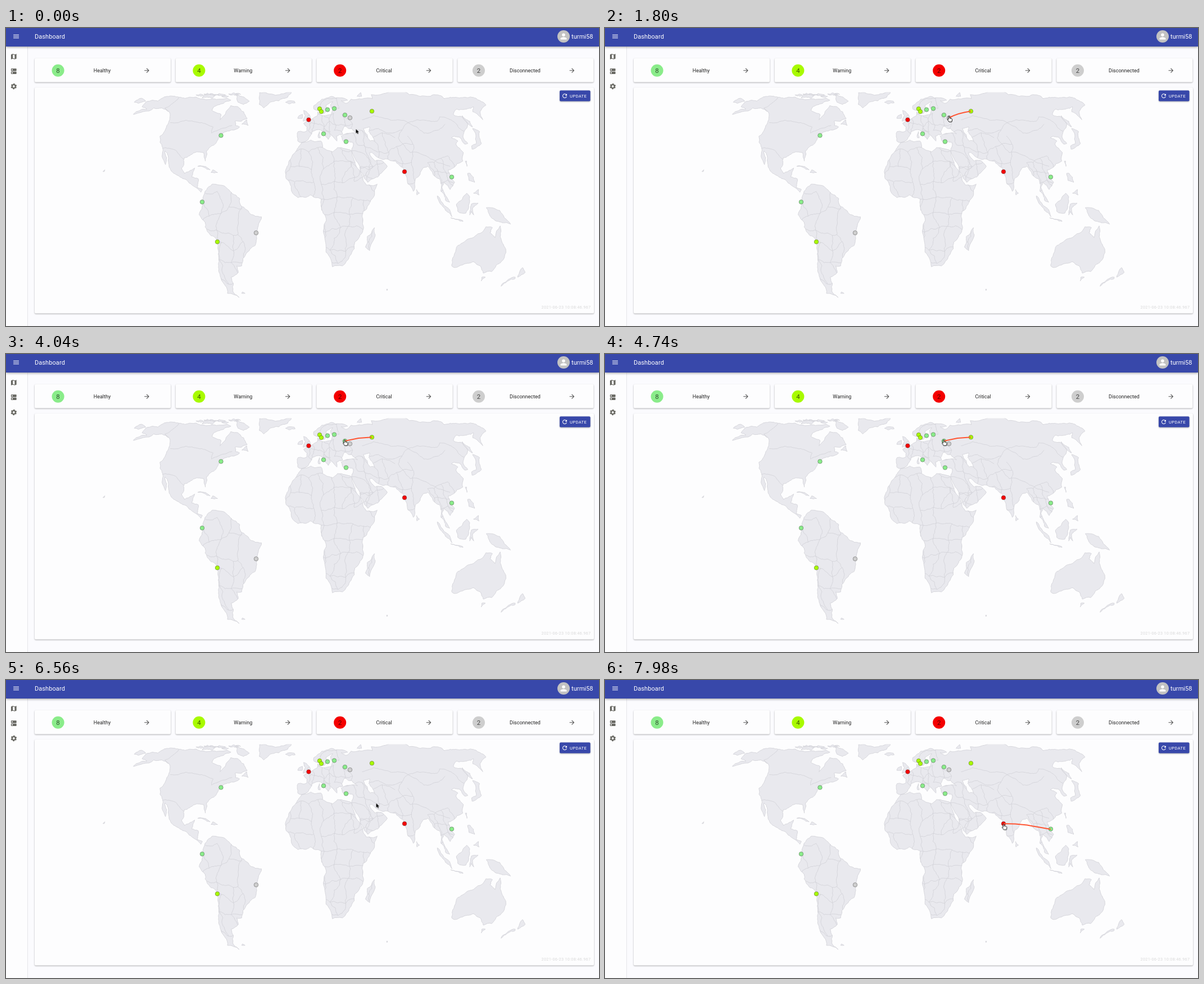
Animation of 1055 by 531 pixels, one loop 8000 ms. Source, as an HTML page:

```html
<!DOCTYPE html>
<html lang="en">
<head>
<meta charset="utf-8">
<title>Dashboard</title>
<style>
html, body { margin: 0; width: 100%; height: 100%; overflow: hidden; background: #fbfbfe; }
svg { display: block; width: 100%; height: 100%; font-family: Roboto, Arial, sans-serif; }
.paper { fill: #fdfdfe; filter: drop-shadow(0 1px 1px rgba(0,0,0,.32)); }
.bar { fill: #3848aa; filter: drop-shadow(0 1px 2px rgba(0,0,0,.4)); }
.bar-text { fill: #fff; font-size: 11px; letter-spacing: .08px; }
.label { fill: #222; font-size: 9px; text-anchor: middle; }
.count { fill: #000; fill-opacity: .65; font-size: 11.5px; text-anchor: middle; }
.icon { fill: #666660; }
.land { fill: #e9e9ee; }
.sea { fill: #fdfdfe; }
.border { fill: none; }
.land, .sea, .border { stroke: #d2d2d8; stroke-width: .85; stroke-linejoin: round; }
.dot { stroke: #444; stroke-opacity: .75; stroke-width: .6; }
.link { fill: none; stroke: #f53; stroke-width: 2; stroke-linejoin: round; visibility: hidden; }
.link, #arrow, #hand { animation: 8s step-end infinite; }
#cursor { animation: move 8s linear infinite; }
#arrow { animation-name: arrow; }
#hand { animation-name: hand; }
#link1 { animation-name: link1; }
#link2 { animation-name: link2; }
#link3 { animation-name: link3; }
@keyframes move {
  0% { transform: translate(622.5px, 180px); }
  3% { transform: translate(621px, 176px); }
  8.5% { transform: translate(615.3px, 160px); }
  10.5%, 36% { transform: translate(612px, 157px); }
  38.75% { transform: translate(608.5px, 156px); }
  43%, 65% { transform: translate(602.5px, 153px); }
  70% { transform: translate(608px, 161px); }
  82% { transform: translate(658.5px, 219.5px); }
  92%, 100% { transform: translate(709.3px, 256.5px); }
}
@keyframes arrow {
  0%, 38.5%, 67% { visibility: visible; }
  10%, 42%, 91.5%, 100% { visibility: hidden; }
}
@keyframes hand {
  0%, 38.5%, 67% { visibility: hidden; }
  10%, 42%, 91.5%, 100% { visibility: visible; }
}
@keyframes link1 { 0%, 40.5% { visibility: hidden; } 10% { visibility: visible; } }
@keyframes link2 { 0%, 67% { visibility: hidden; } 42% { visibility: visible; } }
@keyframes link3 { 0% { visibility: hidden; } 91.5%, 100% { visibility: visible; } }
</style>
</head>
<body>
<svg viewBox="0 0 1055 531">
  <defs>
    <clipPath id="frame"><rect x="52" y="114.5" width="994" height="390"/></clipPath>
    <clipPath id="inland"><path id="inland-path"/></clipPath>
    <path id="next" d="M12 4l-1.41 1.41L16.17 11H4v2h12.17l-5.58 5.59L12 20l8-8z" transform="scale(.54) translate(-12 -12)"/>
  </defs>

  <rect y="33" width="38" height="498" fill="#fdfdfe"/>
  <path d="M38.5 33V531" stroke="#e6e6ea"/>
  <rect class="bar" width="1055" height="33"/>
  <path d="M13.1 12.3H23M13.1 15H23M13.1 17.7H23" stroke="#fff" stroke-width="1.1"/>
  <text class="bar-text" x="51" y="19">Dashboard</text>
  <circle cx="992" cy="15" r="11" fill="#c2c2c2"/>
  <g fill="#fff" transform="translate(983.7 6.7) scale(.69)">
    <circle cx="12" cy="8" r="4"/>
    <path d="M12 14c-2.67 0-8 1.34-8 4v2h16v-2c0-2.66-5.33-4-8-4z"/>
  </g>
  <text class="bar-text" x="1006" y="19">turmi58</text>

  <g class="icon">
    <path transform="translate(7.3 44.5) scale(.54)" d="M20.5 3l-.16.03L15 5.1 9 3 3.36 4.9c-.21.07-.36.25-.36.48V20.5c0 .28.22.5.5.5l.16-.03L9 18.9l6 2.1 5.64-1.9c.21-.07.36-.25.36-.48V3.5c0-.28-.22-.5-.5-.5zM15 19l-6-2.11V5l6 2.11V19z"/>
    <path transform="translate(7.3 70.7) scale(.54)" fill-rule="evenodd" d="M4 3h16l1 1v6l-1 1H4l-1-1V4zM4 13h16l1 1v6l-1 1H4l-1-1v-6zM5 7a2 2 0 1 0 4 0a2 2 0 1 0-4 0zM5 17a2 2 0 1 0 4 0a2 2 0 1 0-4 0z"/>
    <g fill="none" stroke="#666660">
      <circle cx="13.8" cy="104" r="3" stroke-width="2.2"/>
      <circle cx="13.8" cy="104" r="4.4" stroke-width="1.8" stroke-dasharray="2.3" stroke-dashoffset="-1.15"/>
    </g>
  </g>

  <g id="cards"></g>
  <rect class="paper" x="51" y="106" width="995" height="402.5" rx="2"/>
  <g id="map" clip-path="url(#frame)"></g>
  <g id="dots"></g>
  <path class="link" id="link1" d="M612 160Q628 151.5 651 148.3"/>
  <path class="link" id="link2" d="M603 155L627 150 651 148.3"/>
  <path class="link" id="link3" d="M709 256L730 256.4 751 258.6 772 262.3 793 266"/>

  <rect x="985" y="111.3" width="54.6" height="19.2" rx="2" fill="#3848aa" style="filter:drop-shadow(0 1px 1px rgba(0,0,0,.3))"/>
  <path fill="#fff" transform="translate(988 115) scale(.5)" d="M17.65 6.35C16.2 4.9 14.21 4 12 4c-4.42 0-7.99 3.58-7.99 8s3.57 8 7.99 8c3.73 0 6.84-2.55 7.73-6h-2.08c-.82 2.33-3.04 4-5.65 4-3.31 0-6-2.69-6-6s2.69-6 6-6c1.66 0 3.14.69 4.22 1.78L13 11h7V4z"/>
  <text x="1003" y="123.7" fill="#fff" font-size="7.6" letter-spacing=".36">UPDATE</text>
  <text x="952.5" y="500" fill="#d9d9d9" font-size="7.3" letter-spacing=".3">2021-06-23 10:08:46.967</text>

  <g id="cursor" stroke-linejoin="round">
    <path id="arrow" transform="scale(.9)" d="M0 0V8.6L2 6.9 3.4 9.9 4.9 9.2 3.5 6.3H6.2Z" fill="#000" stroke="#fff" stroke-width=".7" paint-order="stroke"/>
    <path id="hand" d="M-1 .6Q0-1 1 .6V3.6L4.4 4.4Q6 4.9 5.7 6.6L4.9 10.3H.2L-2.7 6.5Q-3 5.2-1.9 5.3L-1 6Z" fill="#fff" stroke="#111"/>
  </g>
</svg>

<script>
const NS = 'http://www.w3.org/2000/svg';
const get = id => document.getElementById(id);
const parse = s => s.trim().split(/\s+/).map(p => p.split(',').map(Number));

function add(parent, tag, attrs, text) {
  const el = document.createElementNS(NS, tag);
  for (const k in attrs) el.setAttribute(k, attrs[k]);
  if (text) el.textContent = text;
  parent.append(el);
  return el;
}

// Each status owns its sites on the map; the card shows how many there are.
const statuses = [
  ['Healthy', '#8aec8a', '572,145.5 584,143.5 603,155 565,188.5 605,202.5 382.5,191.5 793,265.5 349,310'],
  ['Warning', '#a8fa00', '558,144 561,149 651,148.3 376,381'],
  ['Critical', '#f40000', '538.5,163.5 709,256'],
  ['Disconnected', '#cecece', '612,160 445,365']
];

statuses.forEach(([label, fill, sites], i) => {
  const g = get('cards'), x = 51 + i * 250.8, spots = parse(sites);
  const wide = label.length > 8 ? 4 : 0;
  const cx = x + 41.6 - wide;
  add(g, 'rect', { class: 'paper', x, y: 54, width: 242, height: 42.5, rx: 2 });
  add(g, 'circle', { cx, cy: 75.7, r: 11, fill });
  add(g, 'text', { class: 'count', x: cx, y: 79.8 }, String(spots.length));
  add(g, 'text', { class: 'label', x: x + 120, y: 79 }, label);
  add(g, 'use', { href: '#next', x: x + 199.5 + wide, y: 75.7, fill: '#555' });
  spots.forEach(([cx, cy]) => add(get('dots'), 'circle', { class: 'dot', cx, cy, r: 3.8, fill }));
});

// Equal Earth projection of degrees to stage pixels.
function project([lon, lat]) {
  const [a, b, c, d] = [1.340264, -.081106, .000893, .003796], rad = Math.PI / 180;
  const t = Math.asin(Math.sqrt(3) / 2 * Math.sin(lat * rad)), q = t * t, q3 = q ** 3;
  const slope = a + 3 * b * q + q3 * (7 * c + 9 * d * q);
  const x = 2 * lon * rad * Math.cos(t) / (Math.sqrt(3) * slope);
  const y = t * (a + b * q + q3 * (c + d * q));
  return [538.7 + 160.3 * x, 317 - 160.3 * y];
}

let seed = 7;
const rnd = () => (seed = seed * 16807 % 2147483647) / 2147483647;

// Splits a stretch at shifted midpoints until it looks like a natural line.
function wander(a, b, rough, out) {
  const dx = b[0] - a[0], dy = b[1] - a[1];
  if (Math.hypot(dx, dy) < 4) { out.push(a); return; }
  const k = (rnd() - .5) * rough;
  const m = [(a[0] + b[0]) / 2 + dy * k, (a[1] + b[1]) / 2 - dx * k];
  wander(a, m, rough, out);
  wander(m, b, rough, out);
}

function trace(points, closed, rough) {
  const pts = points.map(project), out = [], last = pts[pts.length - 1];
  pts.slice(1).forEach((p, i) => wander(pts[i], p, rough, out));
  if (closed) wander(last, pts[0], rough, out); else out.push(last);
  return 'M' + out.map(p => p.map(v => v.toFixed(1)).join(' ')).join('L') + (closed ? 'Z' : '');
}
const outline = s => trace(parse(s), true, .24);

// Coasts as key points in degrees, longitude first.
const northAmerica = `-168,66 -156,71 -141,70 -128,70 -114,68 -96,68 -88,69 -82,67 -87,64 -94,61 -93,58 -82,55
  -80,51 -78,55 -78,62 -70,61 -65,58 -62,57 -56,52 -66,50 -64,47 -60,46 -66,44 -70,43 -74,40.5 -76,35 -81,31
  -80,25 -83,30 -90,30 -97,27 -97,21 -94,18 -91,19 -87,21 -88,16 -83,15 -83,10 -79,9 -80,7.5 -86,11 -92,14.5
  -97,16 -105,20 -109,26 -114,31 -110,23 -117,33 -124,40 -124,48 -133,57 -144,60 -152,60 -158,57 -164,55 -157,59 -165,61`;
const southAmerica = `-77,8 -72,12 -62,10.5 -51,4 -50,0 -35,-6 -39,-14 -41,-22 -48,-26 -54,-34 -58,-34 -58,-38
  -65,-41 -65,-45 -68,-50 -65,-55 -74,-52 -74,-42 -71,-30 -70,-18 -76,-14 -81,-5 -78,2`;
const africa = `-6,36 10,37 11,33 19,30.5 23,33 34,31 34,28 37,21 43,11.5 51,12 48,5 40,-3 40,-15 35,-20 35,-24
  32,-28 27,-34 19,-34.5 12,-17 13,-8 9,0 9,4 5,4.5 1,6 -8,4.5 -13,9 -17,15 -17,21 -13,28 -10,31`;
const siberia = `5,59 5,62 14,68 25,71 33,69.5 41,67 34,66.5 38,64 45,68 54,68.5 68,68.5 70,73 80,73 88,75
  113,76 113,73 130,71 140,73 160,70 170,70 180,69 180,65 178,62.5 170,60 163,57 157,51 156,57 163,61 155,59.5`;
const orient = `143,59 135,55 141,53 140,48 132,43 128,39.5 129,35.5 126.5,35 125,39.5 121,40 118,39 122,37 119,35
  122,30 119,25 110,21 106,20 109,13 105,9 101,13 99,10 104,2 101,3 98,8 98,15 94,17 91,22 87,21 80,15 77.5,8 73,17
  72,21 67,25 57,26 50,30 48,30 51,25 56,25.5 60,22 52,16 44,13 39,21 35,28`;
const europe = `34,31 36,36 28,37 27,40 29,41 35,42 41,41.5 37,45 34,45 31,46.5 28,43 28.5,41.2 23,40 23,37 20,40
  13,45.5 18,40 16,38 10,44 3,43 -1,37.5 -6,36 -9,37 -9,43 -1.5,43.5 -1.5,46 -4.5,48.5 2,51 8,54 8.5,57
  10.5,55 14,54 21,55 24,59 30,60 22,60 22,63 25,65.5 17,62 18,59.5 14,55.5 11,59 8,58`;
const australia = `114,-22 122,-18 129,-15 132,-11.5 137,-12 136,-15 140.5,-17.5 142.5,-11 146,-19 153,-26 153,-31
  150,-37.5 144,-38.5 138,-34 131,-31.5 124,-33 118,-35 115,-34`;
const islands = {
  greenland: '-57,76 -54,70 -50,63 -44,60 -40,65 -23,70 -20,76',
  chukotka: '-180,69 -170,66 -174,64 -180,65',
  baffin: '-82,74 -70,70 -62,66 -66,63 -73,65 -78,70',
  victoria: '-117,72 -105,73 -104,69 -115,69',
  newfoundland: '-59,48 -56,51 -53,47',
  iceland: '-24,65 -15,66 -14,64.5 -20,63.5',
  britain: '-5,58 -2,57 1.5,52.5 -5,50 -3,54',
  ireland: '-10,52 -6,52 -6,55 -9,54',
  sardinia: '9,43 9.5,39 8,39',
  novaya: '53,71 57,74 60,76 58,71',
  cuba: '-85,22 -77,21 -75,20',
  hispaniola: '-74,18.5 -73,20 -69,18.5',
  hawaii: '-156,19 -155,20 -155,19',
  falklands: '-61,-52 -58,-52 -60,-51',
  kerguelen: '69,-49 70,-49 70,-50',
  madagascar: '49,-12 50,-16 47,-25 43.5,-23 44,-17',
  ceylon: '80,9 82,7 80,6',
  japan: '130,32 131,34 136,35.5 140,41 141,45 145,43 141,38 140,35.5 135,33.5',
  sakhalin: '142,46 142,54 144,50',
  taiwan: '121,25 122,25 121,22',
  luzon: '120,18 122,18 124,13 120,14',
  mindanao: '122,7 126,9 126,6',
  borneo: '109,1 117,7 119,5 116,-4 110,-3',
  sumatra: '95,5.5 104,-2 106,-6 101,-2.5',
  java: '105,-6.5 114,-8 114.5,-8.5',
  sulawesi: '119,-5 120,1 125,1.5 121,-1 122,-5 120,-3',
  newGuinea: '131,-1 141,-2.5 150,-10 143,-9 138,-8 133,-4',
  tasmania: '145,-41 148,-41 147,-43.5',
  northNZ: '173,-35 178,-38 175,-41 174,-39',
  southNZ: '173,-41 174,-42 168,-47 167,-45'
};
const eurasia = [siberia, orient, europe].join(' ');
const land = [northAmerica, southAmerica, africa, eurasia, australia, ...Object.values(islands)].map(outline);

// The arctic archipelago is a scatter of small seeded quads.
for (let lon = -122; lon < -75; lon += 6) {
  const lat = 71 + rnd() * 3, w = 2 + rnd() * 3, h = .6 + rnd();
  land.push(trace([[lon - w, lat], [lon, lat + h], [lon + w, lat], [lon, lat - h]], true, .4));
}
const map = get('map');
add(map, 'path', { class: 'land', d: land.join('') });
get('inland-path').setAttribute('d', land.join(''));

// Long frontiers by key points; crowded regions as a jittered net with gaps.
const frontiers = ['-123,49 -95,49 -83,46 -82,42 -75,45 -67,47', '-141,70 -141,60 -131,56',
  '-117,32.5 -106,31.5 -97,26', '48,51 60,54 80,51 88,49 98,51 115,50 120,53 130,48 132,43',
  '88,49 74,39 80,30 92,28 98,25 108,22', '88,49 97,42 111,44 120,48',
  '11,59 13,65 20,69 30,69 30,61', '50,44 60,45 70,42 80,44'];
const borders = frontiers.map(s => trace(parse(s), false, .2));

function net(west, north, east, south, cell) {
  const cols = Math.ceil((east - west) / cell), rows = Math.ceil((north - south) / cell);
  const node = Array.from({ length: rows + 1 }, (_, j) => Array.from({ length: cols + 1 }, (_, i) =>
    [west + (i + rnd() * .7 - .35 + j % 2 * .3) * cell, north - (j + rnd() * .7 - .35) * cell]));
  const edge = (a, b) => { if (b && rnd() > .12) borders.push(trace([a, b], false, .3)); };
  node.forEach((row, j) => row.forEach((p, i) => {
    edge(p, row[i + 1]);
    edge(p, node[j + 1] && node[j + 1][i]);
  }));
}
net(-80, 7, -52, -34, 10);
net(-17, 31, 42, -29, 9);
net(-1, 54, 31, 42, 6);
net(34, 41, 73, 17, 9);
net(92, 26, 108, 12, 6);
add(map, 'path', { class: 'border', d: borders.join(''), 'clip-path': 'url(#inland)' });
add(map, 'path', { class: 'sea', d: outline('47,45 53,46 51,43 54,37 50,37 49,41') });
</script>
</body>
</html>
```
